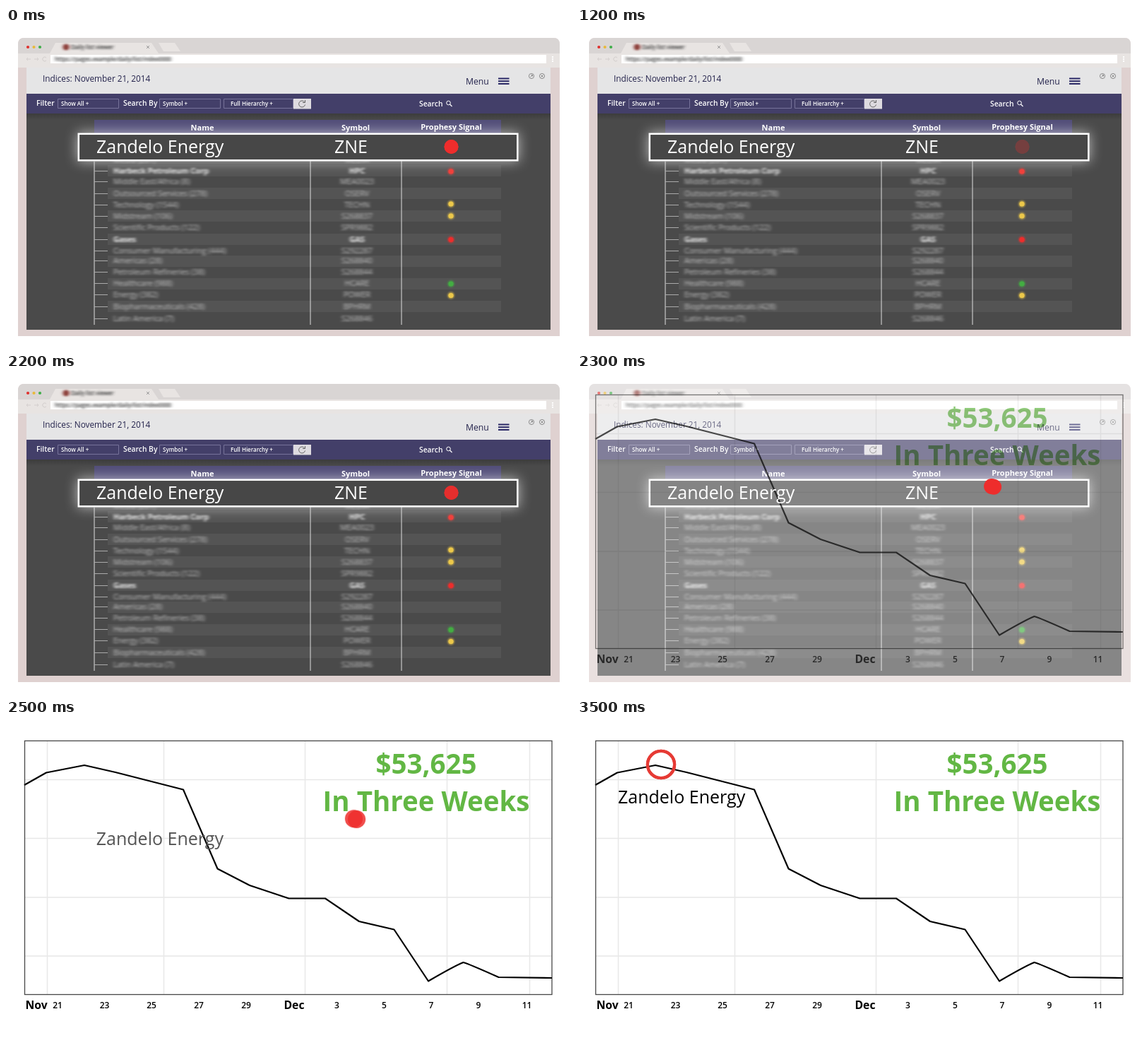
Animation, 800 px wide and 450 px high, one loop 3600 ms. Source, as an HTML page:

```html
<!DOCTYPE html>
<html lang="en">
<head>
<meta charset="utf-8">
<title>Index signal</title>
<style>
  html, body { margin: 0; width: 100%; height: 100%; overflow: hidden; background: #fff; }
  svg { display: block; width: 800px; height: 450px; font-family: "Open Sans", "Noto Sans", sans-serif; }
  .bold { font-weight: 700; }
  .semi { font-weight: 600; }
  .mid { text-anchor: middle; }
  #chart { mix-blend-mode: multiply; }
</style>
</head>
<body>
<svg viewBox="0 0 800 450">
  <defs>
    <filter id="smear" x="-5%" y="-5%" width="110%" height="110%"><feGaussianBlur stdDeviation="2 0.9"/></filter>
    <filter id="glow" x="-10%" y="-120%" width="120%" height="340%"><feGaussianBlur stdDeviation="9"/></filter>
    <filter id="soft" x="-50%" y="-50%" width="200%" height="200%"><feGaussianBlur stdDeviation="1"/></filter>
    <linearGradient id="shade" x2="0" y2="1">
      <stop stop-color="#333" stop-opacity=".6"/><stop offset="1" stop-color="#333" stop-opacity="0"/>
    </linearGradient>
  </defs>
  <rect width="800" height="450" fill="#fff"/>

  <g id="browser">
    <path d="M17 436V23q0-9 9-9H775q9 0 9 9V436Z" fill="#dfd1d0"/>
    <path d="M17 37V23q0-9 9-9H775q9 0 9 9V37Z" fill="#d9d5d4"/>
    <path d="M17 36H62L70 21H206L216 36H784V56H17Z" fill="#e8e4e2"/>
    <path d="M216 21H239L247 33H223Z" fill="#e8e4e2"/>
    <circle cx="31" cy="27" r="2.1" fill="#e0322f"/>
    <circle cx="39.500" cy="27" r="2.100" fill="#e8b93a"/>
    <circle cx="48" cy="27" r="2.100" fill="#3fae49"/>
    <rect x="63" y="38" width="702" height="12" fill="#fff"/>
    <path d="M199 25l4 4m0-4l-4 4" stroke="#999" fill="none"/>
    <path d="M35 44h-6l2-2m-2 2l2 2M40 44h6l-2-2m2 2l-2 2M57 42a3 3 0 1 0 0 4" stroke="#d3cecd" fill="none"/>
    <path d="M774 40v8" stroke="#fff" stroke-width="2" stroke-dasharray="2 1"/>
    <g filter="url(#smear)" fill="#333">
      <circle cx="85" cy="27" r="4.500" fill="#8a3a34"/>
      <text x="92" y="30" font-size="8" class="semi">Daily list viewer</text>
      <text x="69" y="47" font-size="8" class="semi">https://pages.example/daily/list/index0000</text>
    </g>

    <rect x="29" y="56" width="742" height="37" fill="#e5e5e6"/>
    <text x="52" y="76" font-size="11.800" fill="#24234c">Indices: November 21, 2014</text>
    <text x="651" y="79.500" font-size="12.200" fill="#24234c">Menu</text>
    <path d="M697 71.500h15.500M697 75.300h15.500M697 79.100h15.500" stroke="#2b2966" stroke-width="2"/>
    <g fill="none" stroke="#777" stroke-width=".8">
      <circle cx="744" cy="68" r="3.600"/><path d="M742.500 69.500l3-3m-2 0h2v2"/>
      <circle cx="759" cy="68" r="3.600"/><path d="M757.500 66.500l3 3m0-3l-3 3"/>
    </g>

    <rect x="29" y="121" width="742" height="306" fill="#4a4a4a"/>
    <rect x="29" y="93" width="742" height="28" fill="#433f69"/>
    <rect x="29" y="121" width="742" height="9" fill="url(#shade)"/>
    <g fill="#fff">
      <text x="43" y="110" font-size="10.300" class="semi">Filter</text>
      <text x="166" y="110" font-size="10.300" class="semi">Search By</text>
      <text x="585" y="111" font-size="10.300" class="semi">Search</text>
      <g font-size="8" class="semi">
        <text x="78" y="109.500">Show All +</text>
        <text x="222" y="109.500">Symbol +</text>
        <text x="318" y="109.500">Full Hierarchy +</text>
      </g>
    </g>
    <path d="M73.500 100.500h86v13h-86ZM217.500 100.500h86v13h-86ZM308.500 100.500h98v13h-98Z" fill="none" stroke="#77739a"/>
    <rect x="407" y="100" width="25" height="14.500" fill="#dedbe0"/>
    <path d="M422.500 104.500a4.500 4.500 0 1 0 1 4M423.500 102v3.500h-3.500" fill="none" stroke="#666"/>
    <circle cx="626.500" cy="106" r="2.800" fill="none" stroke="#fff"/>
    <path d="M628.500 108l3 3" stroke="#fff" stroke-width="1.300"/>

    <rect x="125" y="130" width="576" height="19" fill="#514d78"/>
    <g id="stripes"></g>
    <rect x="101" y="148" width="625" height="41" fill="#fff" opacity=".6" filter="url(#glow)"/>
    <g id="rows" filter="url(#smear)" fill="#c4c4c4" font-size="11"></g>
    <g id="lines" fill="none" stroke="#dedede"></g>
    <g id="lamps"></g>
    <g fill="#fff" class="bold mid" font-size="11">
      <text x="278" y="145">Name</text>
      <text x="495" y="145">Symbol</text>
      <text x="630.500" y="144">Prophesy Signal</text>
    </g>
    <rect x="102.800" y="149.800" width="621.500" height="37.500" fill="#474747" stroke="#fff" stroke-width="2.500"/>
    <text x="465" y="177" font-size="25" fill="#fff">ZNE</text>
  </g>

  <g id="chart">
    <path d="M58.500 30V388M223.500 30V388M423.500 30V388M624.500 30V388M741.500 30V388M27 84.500H773M27 167.500H773M27 251H773M27 334H773"
      stroke="#e8e8e8" stroke-width="1.500"/>
    <rect x="26.500" y="29.500" width="746.500" height="359" fill="none" stroke="#484848" stroke-width="1.300"/>
    <path d="M26 92L57 74.500L111 64L155 74L251 98.500L299.500 210.500L345 234L400.500 252.500H452L500 285L549.500 296.500L598 369.500Q635 348 647.500 343Q655 345 697.500 364L773 365"
      fill="none" stroke="#000" stroke-width="2.200" stroke-linejoin="round"/>
    <g class="bold mid" font-size="38.500" fill="#62b744">
      <text x="595" y="76">$53,625</text>
      <text x="595" y="129">In Three Weeks</text>
    </g>
    <g class="bold" font-size="15.700">
      <text x="27.500" y="409">Nov</text>
      <text x="393.500" y="409">Dec</text>
    </g>
    <g id="days" class="semi mid" font-size="12"></g>
  </g>

  <text id="name" font-size="25">Zandelo Energy</text>
  <g id="dot" fill="#ee2d2c" stroke="#e63a34"><circle/><circle/></g>
</svg>
<script>
const $ = id => document.getElementById(id);

const rows = [
  [191, "Media (281)", "MEDIA"],
  [206, "Harbeck Petroleum Corp", "HPC", 1],
  [221, "Middle East/Africa (8)", "MEA0023"],
  [238, "Outsourced Services (278)", "OSERV"],
  [254, "Technology (1544)", "TECHN"],
  [270, "Midstream (106)", "S268837"],
  [286, "Scientific Products (122)", "SPR9882"],
  [303, "Gases", "GAS", 1],
  [319, "Consumer Manufacturing (444)", "S292287"],
  [333, "Americas (28)", "S268840"],
  [349, "Petroleum Refineries (38)", "S268844"],
  [365, "Healthcare (988)", "HCARE"],
  [381, "Energy (382)", "POWER"],
  [398, "Biopharmaceuticals (428)", "BPHRM"],
  [415, "Latin America (7)", "S268846"]
];
$("rows").innerHTML = rows.map(([y, label, code, strong]) => {
  const look = strong ? 'class="bold" fill="#eee"' : "";
  return `<g ${look}><text x="152" y="${y}">${label}</text>` +
    `<text x="497" y="${y}" text-anchor="middle">${code}</text></g>`;
}).join("");

$("stripes").innerHTML = [194, 226, 258, 291, 322, 354, 386].map(y =>
  `<rect x="144" y="${y}" width="557" height="16" fill="#545454"/>`).join("");

$("lines").innerHTML =
  '<path d="M125 189V420M431 149V420M560 149V420"/>' +
  rows.slice(1).map(r => `<path d="M125 ${r[0] - 3.5}h19" stroke="#aaa"/>`).join("");

const lamps = [[203, "#f0413c"], [249, "#ecc84a"], [266, "#ecc84a"], [299.5, "#ee2d2c"], [362, "#43ad42"], [378.5, "#ecc84a"]];
$("lamps").innerHTML = lamps.map(([y, c]) =>
  `<circle cx="630" cy="${y}" r="5" fill="${c}" opacity=".6" filter="url(#soft)"/>` +
  `<circle cx="630" cy="${y}" r="3.6" fill="${c}"/>`).join("");

const days = [[73, 21], [139.5, 23], [206, 25], [273, 27], [340, 29], [468.5, 3], [535.5, 5], [602, 7], [669, 9], [737.5, 11]];
$("days").innerHTML = days.map(([x, d]) => `<text x="${x}" y="408">${d}</text>`).join("");

const LOOP = 3600, STEP = 100;
const tracks = {
  browser: [[2200, 1], [2500, 0]],
  chart: [[2200, 0], [2300, .7], [2400, 1]],
  ink: [[2300, 255], [2600, 0]],
  travel: [[2200, 0], [2300, .082], [2400, .166], [2900, .665], [3000, .76], [3100, .845], [3200, .915], [3300, .97], [3400, 1]],
  radius: [[2200, 10], [2300, 11], [2400, 12.5], [2900, 18], [3300, 21.2]],
  spread: [[2200, 0], [2300, 1.5], [2900, 3], [3400, 0]],
  fill: [[2400, 1], [2900, .2], [3200, 0]],
  ring: [[2400, 0], [2900, .5], [3300, 1]]
};

function at(key, t) {
  const p = tracks[key];
  if (t <= p[0][0]) return p[0][1];
  for (let i = 1; i < p.length; i++) {
    const [t0, v0] = p[i - 1], [t1, v1] = p[i];
    if (t <= t1) return v0 + (v1 - v0) * (t - t0) / (t1 - t0);
  }
  return p[p.length - 1][1];
}

const mix = (a, b, k) => a + (b - a) * k;
const clamp = v => Math.min(1, Math.max(0, v));
const easeInOut = u => u < .5 ? 4 * u ** 3 : 1 - 4 * (1 - u) ** 3;

function set(el, attrs) {
  for (const k in attrs) el.setAttribute(k, attrs[k]);
}

function draw(t) {
  set($("browser"), { opacity: at("browser", t) });
  $("chart").style.opacity = at("chart", t);

  const slide = easeInOut(clamp((t - 2400) / 1100));
  const ink = Math.round(at("ink", t));
  set($("name"), { x: mix(128, 58, slide), y: mix(177, 118, slide), fill: `rgb(${ink},${ink},${ink})` });

  // One slow pulse before the dot leaves the table
  const pulse = t < 2300 ? .64 + .36 * Math.cos(t / 2400 * 2 * Math.PI) : 1;
  const k = at("travel", t), s = at("spread", t);
  const x = mix(630.5, 119, k), y = mix(168, 63, k);
  const ring = at("ring", t), width = ring ? 2 + 2.2 * ring : 0;
  set($("dot"), { opacity: pulse, "fill-opacity": at("fill", t), "stroke-opacity": ring, "stroke-width": width });
  [...$("dot").children].forEach((c, i) => {
    const side = i ? s : -s;
    set(c, { cx: x + side, cy: y + side * .2, r: at("radius", t) - width / 2 });
  });
}

const start = performance.now();
function tick() {
  const t = (performance.now() - start) % LOOP;
  draw(Math.floor(t / STEP) * STEP);
  requestAnimationFrame(tick);
}
tick();
</script>
</body>
</html>
```
